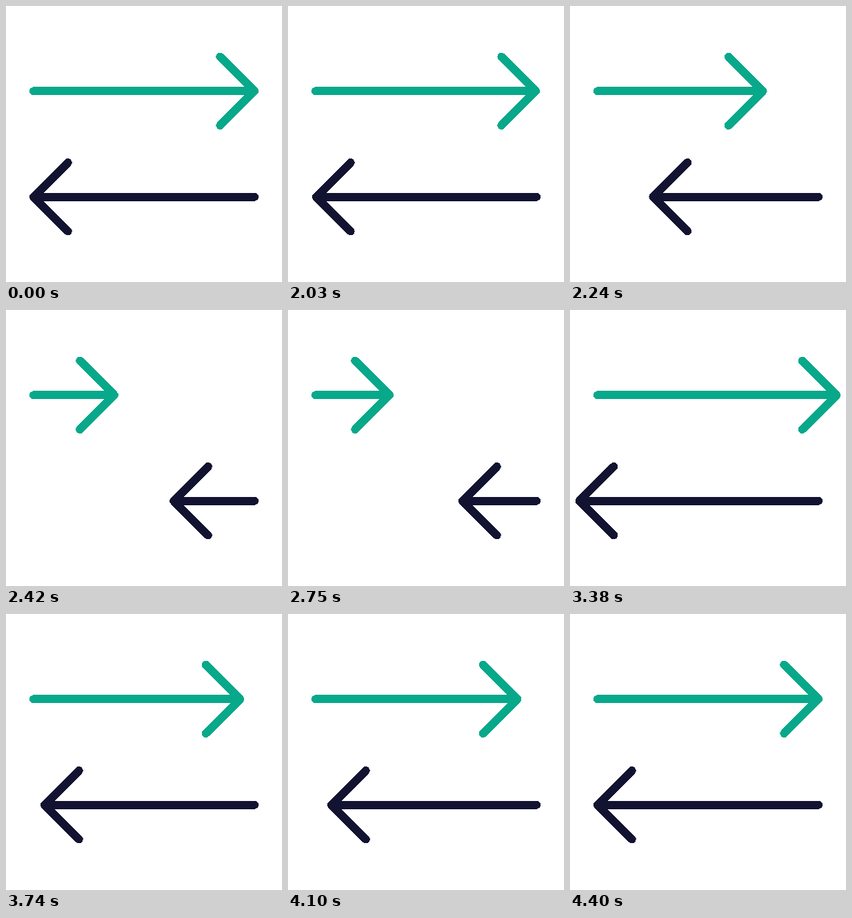
An HTML page for the animation above (4.43 s loop, 400 px wide and 400 px high).

```html
<!DOCTYPE html>
<html lang="en">
<head>
<meta charset="utf-8">
<title>Exchange arrows</title>
<style>
  /* how far the tip has moved from rest */
  @property --reach {
    syntax: "<length>";
    inherits: true;
    initial-value: 0px;
  }
  html, body {
    margin: 0;
    width: 100%;
    height: 100%;
    overflow: hidden;
    background: #fff;
  }
  svg {
    display: block;
    width: 100%;
    height: 100%;
    shape-rendering: crispEdges;
  }
  .arrow {
    color: #08a88a;
    --recoil: -39.5px;
    animation: swap 4430ms cubic-bezier(.5, 0, .5, 1) infinite;
  }
  .back {
    color: #121331;
    --recoil: -33px;
  }
  .shaft {
    fill: currentColor;
    width: calc(332px + var(--reach));
  }
  .head {
    fill: none;
    stroke: currentColor;
    stroke-width: 12;
    stroke-linecap: round;
    stroke-linejoin: round;
    transform: translateX(var(--reach));
  }

  /* rest, pull in, overshoot, recoil, settle */
  @keyframes swap {
    0%, 45.15%, 99.32%, 100% { --reach: 0px; }
    58.01% { --reach: -230px; }
    78.33% { --reach: 30px; }
    88.15% { --reach: var(--recoil); }
  }
</style>
</head>
<body>
<svg viewBox="0 0 400 400">
  <g class="arrow">
    <rect class="shaft" x="34" y="117.3" width="332" height="12" rx="6"/>
    <path class="head" d="M310.3 73.6l49.7 49.7l-49.7 49.7"/>
  </g>
  <g transform="rotate(180 200 200)">
    <g class="arrow back">
      <rect class="shaft" x="34" y="117.3" width="332" height="12" rx="6"/>
      <path class="head" d="M310.3 73.6l49.7 49.7l-49.7 49.7"/>
    </g>
  </g>
</svg>
</body>
</html>
```
